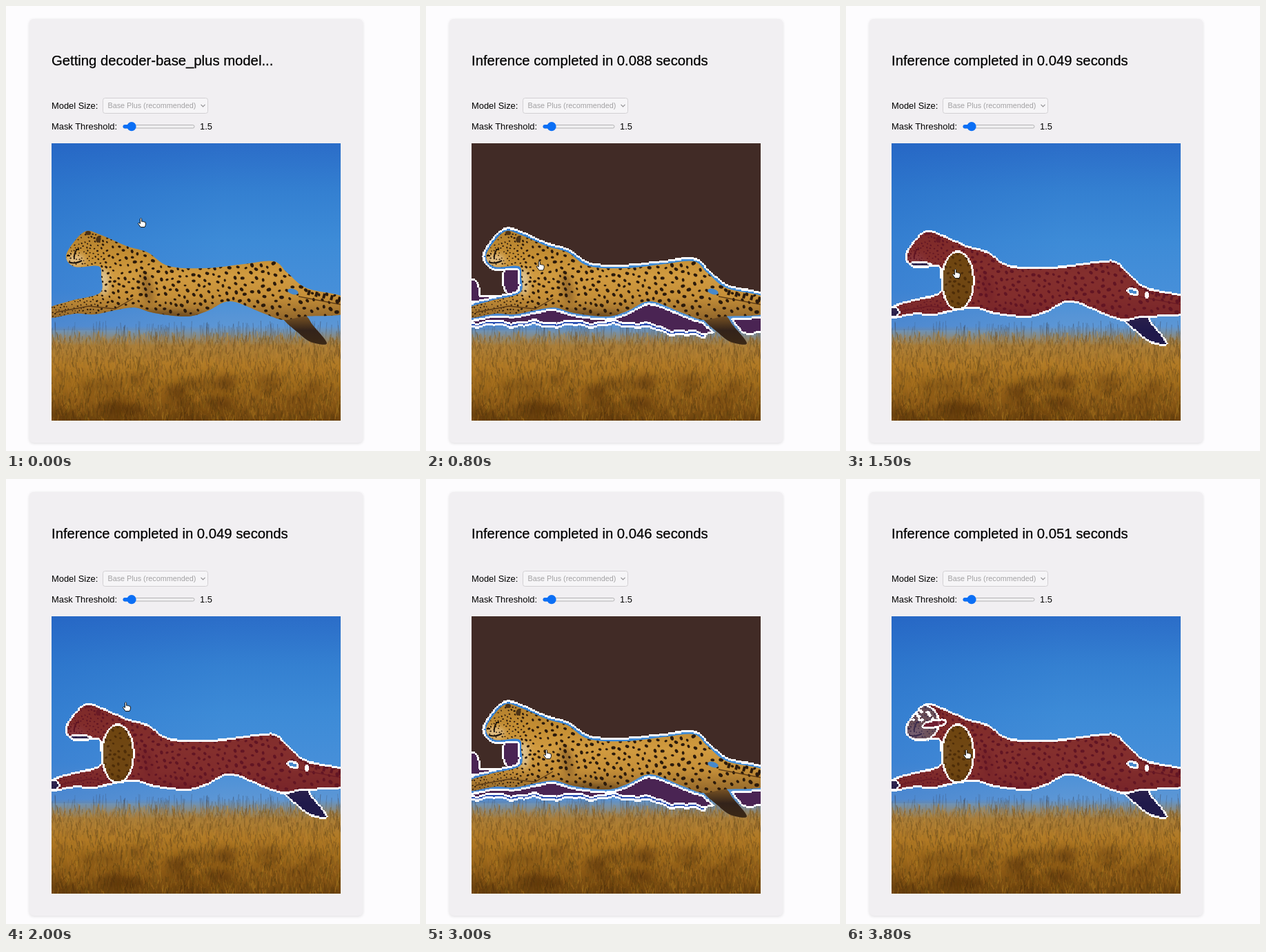
These frames come from a looping animation (600x645 px, 3.9 s). An HTML page with a canvas:

```html
<!DOCTYPE html>
<html lang="en">
<head>
<meta charset="utf-8">
<title>Segmentation demo</title>
<style>
html, body { margin: 0; width: 100%; height: 100%; overflow: hidden; background: #fdfcfe; }
#stage { position: absolute; left: 0; top: 0; width: 600px; height: 645px; overflow: hidden; }
#card { position: absolute; left: 34px; top: 19px; width: 483px; height: 614px; border-radius: 6px;
  background: #f1eff2; box-shadow: 0 1px 4px rgba(0, 0, 0, .13); }
canvas { position: absolute; left: 66px; top: 199px; }
svg { position: absolute; left: 0; top: 0; }
text { font-family: "Liberation Sans", Arial, sans-serif; font-size: 12.9px; fill: #000; }
#title { font-size: 20.3px; stroke: #000; stroke-width: .25px; }
#size { font-size: 10.8px; fill: #a2a1a3; }
</style>
</head>
<body>
<div id="stage">
  <div id="card"></div>
  <canvas id="photo" width="419" height="402"></canvas>
  <svg width="600" height="645" viewBox="0 0 600 645">
    <text id="title" x="66" y="86"></text>
    <text x="66" y="149">Model Size:</text>
    <rect x="140.5" y="133.5" width="152" height="22" rx="3" fill="#f6f5f7" stroke="#d2d0d3"/>
    <text id="size" x="147.5" y="148">Base Plus (recommended)</text>
    <path d="M282.5 142.8l3 3 3-3" fill="none" stroke="#929193" stroke-width="1.2"/>
    <text x="66" y="179">Mask Threshold:</text>
    <rect x="170" y="172.5" width="103" height="4.5" rx="2.2" fill="#efeff0" stroke="#b4b3b5"/>
    <rect x="169.5" y="172" width="14" height="5.5" rx="2.7" fill="#0b6ff5"/>
    <circle cx="182" cy="174.7" r="6.6" fill="#0b6ff5"/>
    <text x="281" y="179">1.5</text>
    <path id="hand" fill="#fff" stroke="#111" stroke-linejoin="round"
      d="M-2.6 1.5V-5.6q1.1-1.6 2.2 0V-1.5q1.2-1 2.1.3 1.2-.8 2 .5 1.5-.5 1.7.8V3.4L4 6.6H-1.8L-5.6 1.4q.4-2 3 .1z"/>
  </svg>
</div>
<script>
const W = 419, H = 402, X0 = 66, Y0 = 199, LOOP = 3900, GRID = 256;

function random(seed) {
  return () => (seed = (seed * 16807) % 2147483647) / 2147483647;
}

const clamp = v => Math.min(1, Math.max(0, v));
const ease = v => clamp(v) ** 2 * (3 - 2 * clamp(v));

// Closed Catmull-Rom curve through a few key points.
function smooth(text) {
  const pts = text.split(' ').map(p => p.split(',').map(Number));
  const at = i => pts[(i + pts.length) % pts.length];
  const path = new Path2D();
  path.moveTo(...pts[0]);
  pts.forEach((p, i) => {
    const prev = at(i - 1), next = at(i + 1), after = at(i + 2);
    path.bezierCurveTo(
      ...p.map((v, k) => v + (next[k] - prev[k]) / 6),
      ...next.map((v, k) => v - (after[k] - p[k]) / 6),
      ...next);
  });
  return path;
}

function oval(x, y, rx, ry, turn = 0) {
  const path = new Path2D();
  path.ellipse(x, y, rx, ry, turn, 0, 7);
  return path;
}

function box(y0, y1) {
  const path = new Path2D();
  path.rect(X0, y0, W, y1 - y0);
  return path;
}

function layer(draw, w = W, h = H) {
  const canvas = document.createElement('canvas');
  canvas.width = w;
  canvas.height = h;
  const g = canvas.getContext('2d');
  g.scale(w / W, h / H);
  g.translate(-X0, -Y0);
  draw(g);
  return canvas;
}

function fill(g, color, path) {
  g.fillStyle = color;
  g.fill(path);
}

function line(g, color, width, d) {
  g.strokeStyle = color;
  g.lineWidth = width;
  g.stroke(new Path2D(d));
}

function ramp(g, y0, y1, ...colors) {
  const grad = g.createLinearGradient(0, y0, 0, y1);
  colors.forEach((c, i) => grad.addColorStop(i / (colors.length - 1), c));
  return grad;
}

// A tinted area on the mask grid with a white border of cells.
function region(g, color, { add, cut = [], within, grow = 0 }) {
  const cells = layer(c => {
    add.forEach(p => c.fill(p));
    c.globalCompositeOperation = 'destination-out';
    c.lineWidth = grow * 2;
    for (const p of cut) {
      c.fill(p);
      if (grow) c.stroke(p);
    }
    c.globalCompositeOperation = 'destination-in';
    if (within) c.fill(within);
  }, GRID, GRID);
  const c = cells.getContext('2d');
  const { data } = c.getImageData(0, 0, GRID, GRID);
  const last = GRID - 1, limit = v => Math.min(last, Math.max(0, v));
  const on = (x, y) => data[(limit(y) * GRID + limit(x)) * 4 + 3] > 127;
  c.globalCompositeOperation = 'source-over';
  c.resetTransform();
  c.clearRect(0, 0, GRID, GRID);
  for (let y = 0; y < GRID; y++) {
    for (let x = 0; x < GRID; x++) {
      const inside = on(x, y);
      const border = [on(x - 1, y), on(x + 1, y), on(x, y - 1), on(x, y + 1)].some(v => v !== inside);
      if (!inside && !border) continue;
      c.fillStyle = border ? '#fff' : color;
      c.fillRect(x, y, 1, 1);
    }
  }
  g.imageSmoothingEnabled = false;
  g.drawImage(cells, X0, Y0, W, H);
}

const body = smooth('138,332 175,348 205,357 236,377 290,380 345,374 388,370 408,387 436,409 490,422 ' +
  '490,446 432,450 402,455 372,445 325,428 292,442 262,450 215,445 186,437 ' +
  '158,441 128,447 100,446 62,452 62,438 95,427 136,416 138,392 ' +
  '134,377 100,378 87,363 100,340 117,326');
const paw = smooth('402,452 424,474 442,487 465,489 445,463 432,448');
const gap = oval(416, 414, 8, 4, .3);
const foreleg = oval(162, 398, 23, 42);
const face = oval(108, 353, 27, 26);

function drawField(g) {
  const rnd = random(71);
  fill(g, ramp(g, 199, 482, '#2b6dc8', '#3480d1', '#3d8bd7', '#468fd9', '#6499d4'), box(199, 500));
  const shade = g.createLinearGradient(X0, 0, X0 + W * .6, 0);
  shade.addColorStop(0, 'rgba(20,80,185,.2)');
  shade.addColorStop(1, 'rgba(20,80,185,0)');
  fill(g, shade, box(199, 470));

  for (let i = 0; i < 190; i++) {
    const x = X0 + rnd() * W;
    line(g, `rgba(58,66,84,${.2 + rnd() * .4})`, .8, `M${x} 488L${x + rnd() * 8 - 4} ${456 + rnd() * 18}`);
  }
  fill(g, ramp(g, 464, 492, 'rgba(160,130,80,0)', '#a87d39'), box(464, 492));
  fill(g, ramp(g, 492, 601, '#a87d39', '#b17a25', '#a06b1b', '#8a5815', '#6b420d'), box(492, 601));
  for (let i = 0; i < 4200; i++) {
    const depth = i / 4200, x = X0 + rnd() * W, y = 482 + depth * 124;
    const light = 27 + rnd() * 24 - depth * 11;
    line(g, `hsla(${33 + rnd() * 7},${52 + depth * 20}%,${light}%,.5)`, .7 + rnd(),
      `M${x} ${y}l${rnd() * 6 - 3} ${-4 - rnd() * 9}`);
  }
  g.filter = 'blur(6px)';
  for (let i = 0; i < 26; i++) {
    fill(g, 'rgba(70,38,8,.3)', oval(X0 + rnd() * W, 540 + rnd() * 65, 8 + rnd() * 16, 5 + rnd() * 6));
  }
  g.filter = 'none';
}

// Spots keep a minimum distance and shrink toward the head and paws.
function drawSpots(g) {
  const rnd = random(19), spots = [];
  for (let i = 0; i < 9000; i++) {
    const x = X0 + rnd() * W, y = 330 + rnd() * 126;
    const scale = .45 + .55 * ease((x - 105) / 80) + .12 * ease((x - 300) / 80);
    if (spots.some(s => Math.hypot(s[0] - x, s[1] - y) < 7.6 * scale)) continue;
    spots.push([x, y]);
    const r = scale * (1.7 + rnd());
    fill(g, '#2b1a0b', oval(x, y, r * 1.15, r * .85, rnd() * 2 - .5));
  }
}

function drawCat(g) {
  fill(g, ramp(g, 450, 490, '#765123', '#33231a', '#3b2816'), paw);
  fill(g, ramp(g, 330, 452, '#b5822f', '#c48e33', '#d19b40', '#c58f38', '#94682b'), body);
  g.save();
  g.clip(body);
  g.filter = 'blur(4px)';
  fill(g, '#dcc596', oval(142, 400, 7, 20));
  fill(g, '#6e4c20', oval(245, 449, 62, 6, .05));
  fill(g, '#9b6e2e', oval(205, 410, 8, 24, -.2));
  fill(g, '#dfbd84', oval(100, 368, 14, 9));
  g.filter = 'none';
  drawSpots(g);
  g.restore();
  fill(g, '#4789cc', gap);
  for (let i = 0; i < 5; i++) line(g, '#2b1a0b', 4, `M${440 + i * 11} ${412 + i * 2.4}l-2 7`);
  line(g, 'rgba(70,42,14,.8)', 1.4, 'M424 421L486 433M72 444L120 435 158 439 184 424');
  fill(g, '#4b3216', oval(119, 329, 4, 3));
  fill(g, '#4b3216', oval(134, 338, 3.5, 5, .3));
  line(g, '#20150b', 2, 'M101 353h5M102 354Q98 360 99 367M88 362h5M91 371Q99 375 110 369');
}

// Lower rim of the background mask.
function shore(x) {
  return 458 + 15 * ease((x - 290) / 100) + 2 * Math.sin(x / 9) + Math.sin(x / 3.7);
}

function band(top, bottom, x0, x1) {
  const path = new Path2D();
  for (let x = x0; x <= x1; x++) path.lineTo(x, top(x));
  for (let x = x1; x >= x0; x--) path.lineTo(x, bottom(x));
  return path;
}

function drawSkyMask(g) {
  const cut = [body, paw], right = X0 + W;
  region(g, '#2d52b4', { add: [band(shore, x => shore(x) + 5, X0, 405)], cut, grow: 4 });
  region(g, '#4a2453', { add: [band(() => 430, shore, X0, right)], cut, grow: 4 });
  region(g, '#4a2453', { add: [box(199, 428)], cut, grow: 4 });
  region(g, '#412b26', {
    add: [box(199, 421)],
    cut: [...cut, oval(66, 417, 8, 17), oval(124, 396, 9, 18)],
    grow: 4
  });
}

function drawCatMask(g, faceOut) {
  const rnd = random(5), red = 'rgba(113,20,42,.8)', navy = 'rgba(29,24,84,.85)';
  const chin = oval(107, 376, 17, 5), toes = oval(66, 443, 11, 8);
  const head = faceOut ? face : chin;
  region(g, navy, { add: [paw], cut: [body] });
  region(g, red, { add: [body], cut: [foreleg, toes, head, gap, oval(436, 419, 2, 4)] });
  region(g, 'rgba(88,51,8,.8)', { add: [foreleg], within: body });
  region(g, navy, { add: [toes], within: body });
  if (!faceOut) return region(g, navy, { add: [chin], within: body });
  const holes = Array.from({ length: 9 }, () => oval(98 + rnd() * 30, 336 + rnd() * 20, 1.5, 1.5));
  region(g, 'rgba(72,55,104,.7)', { add: [face], cut: holes, within: body });
  region(g, red, { add: [oval(128, 355, 18, 5, -.2)], within: body });
}

const base = layer(g => { drawField(g); drawCat(g); });
const skyMask = layer(drawSkyMask);
const clicks = [
  { at: 0, x: 197, y: 314, secs: '0.088', mask: skyMask },
  { at: 1000, x: 160, y: 388, secs: '0.049', mask: layer(g => drawCatMask(g, false)) },
  { at: 2100, x: 175, y: 330, secs: '0.046', mask: skyMask },
  { at: 3100, x: 176, y: 399, secs: '0.051', mask: layer(g => drawCatMask(g, true)) }
];

const ctx = document.getElementById('photo').getContext('2d');
const title = document.getElementById('title');
const hand = document.getElementById('hand');
let shown;

function show(click, loading) {
  const key = click.secs + loading;
  if (key === shown) return;
  shown = key;
  title.textContent = loading
    ? 'Getting decoder-base_plus model...'
    : `Inference completed in ${click.secs} seconds`;
  ctx.drawImage(base, 0, 0);
  if (!loading) ctx.drawImage(click.mask, 0, 0);
}

function frame() {
  const t = Math.floor(performance.now() % LOOP / 100) * 100;
  const i = clicks.findLastIndex(c => c.at <= t);
  const now = clicks[i], next = clicks[i + 1] || now;
  const k = ease((t - next.at + 500) / 400);
  show(now, t < now.at + 200);
  hand.setAttribute('transform', `translate(${now.x + (next.x - now.x) * k} ${now.y + (next.y - now.y) * k})`);
  requestAnimationFrame(frame);
}
frame();
</script>
</body>
</html>
```
